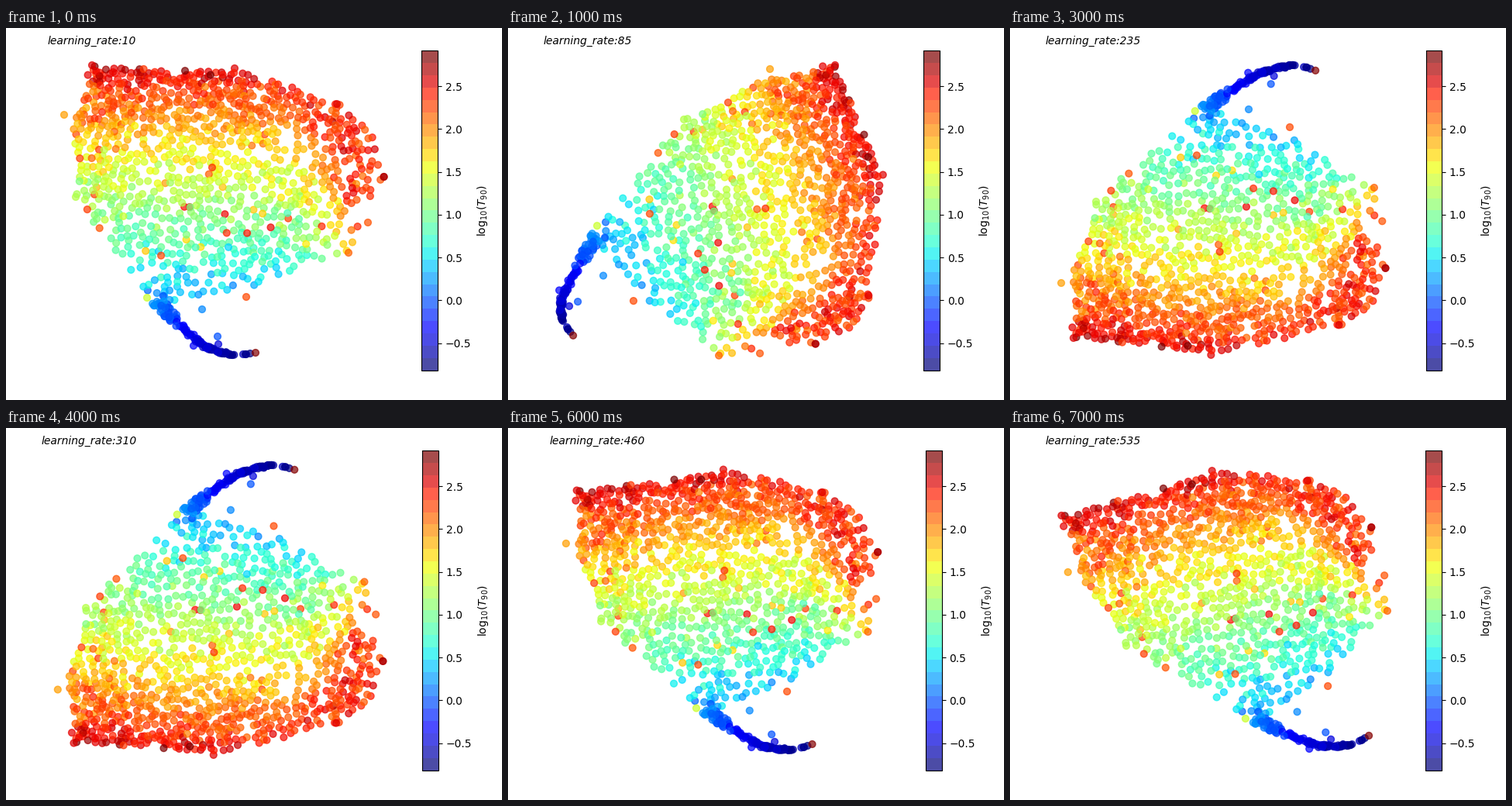
These frames come from a looping animation (640x480 px, 8 s). A matplotlib script:

```python
import numpy as np
import matplotlib.pyplot as plt
from matplotlib.animation import FuncAnimation
from matplotlib.colors import Normalize
from matplotlib.path import Path

W, H, DPI = 640, 480, 100
TOP, BOTTOM = 29.2, 441.6
RATES = [10, 85, 160, 235, 310, 385, 460, 535]
LEFT = [53.3, 45.3, 53.3, 45.3, 46.0, 45.6, 53.3, 45.3]
BAR = [536.4, 536.4, 539.3, 536.5, 537.3, 538.2, 539.2, 536.4]

# Twelve anchors of the embedding for each learning rate, in pixels:
# seven around the broad side, two at the neck, three along the tail.
POSES = {
    10: [(75, 112), (111, 48), (295, 52), (427, 98), (488, 192), (442, 290),
         (310, 347), (90, 218), (182, 348), (257, 412), (292, 422), (322, 419)],
    85: [(338, 53), (422, 47), (484, 189), (465, 346), (397, 407), (272, 423),
         (162, 352), (227, 118), (115, 255), (68, 351), (70, 376), (84, 397)],
    160: [(490, 124), (463, 56), (283, 48), (127, 98), (75, 177), (107, 279),
          (229, 345), (461, 229), (355, 353), (272, 413), (238, 422), (210, 417)],
    235: [(66, 329), (82, 400), (259, 422), (425, 383), (484, 310), (470, 206),
          (361, 128), (111, 224), (239, 107), (322, 58), (366, 47), (394, 55)],
    385: [(66, 346), (93, 413), (276, 422), (428, 378), (488, 292), (455, 191),
          (330, 125), (95, 240), (203, 116), (277, 59), (321, 47), (350, 53)],
    535: [(75, 186), (66, 113), (261, 55), (384, 68), (466, 128), (487, 236),
          (410, 333), (150, 281), (304, 375), (400, 411), (440, 409), (463, 397)],
}
POSES = {rate: np.array(pts, float) for rate, pts in POSES.items()}
POSES[310] = (POSES[235] + POSES[385]) / 2
POSES[460] = (POSES[10] + POSES[535]) / 2
ANCHOR_VALUES = [1.95, 2.6, 2.6, 2.6, 2.75, 2.2, 2.3, 1.3, 1.4, -0.6, -0.75, 2.9]

OUTLINE = Path([(106, 49), (200, 54), (300, 57), (345, 68), (430, 98),
                (470, 130), (487, 165), (487, 195), (478, 225), (468, 253),
                (442, 291), (420, 292), (385, 308), (330, 330), (262, 342),
                (215, 352), (185, 345), (140, 290), (112, 250), (90, 218),
                (90, 165), (86, 125), (102, 85)])
EXTRAS = [(306, 421, -0.6), (310, 421, -0.75), (315, 420, -0.8),
          (273, 398, -0.05), (253, 363, 0.15), (242, 410, -0.4),
          (274, 408, -0.5), (237, 231, 2.55), (266, 180, 2.4),
          (488, 192, 2.75), (309, 421, -0.8)]

rng = np.random.default_rng(12)


def weight(x, y):
    """Relative density: crowded along the top and the left corner."""
    w = 0.42 + 0.55 * np.exp(-(y - 50) / 50)
    if y < 210:
        w += 0.45 * np.exp(-((x - 120) / 35) ** 2)
    return w * (0.55 if x > 400 and y > 200 else 1)


def body_points(count):
    pts = np.empty((count, 2))
    n = 0
    while n < count:
        x, y = rng.uniform((80, 46), (490, 355))
        if rng.random() > weight(x, y) or not OUTLINE.contains_point((x, y)):
            continue
        gap = 3 + 2.5 * np.clip((y - 60) / 100, 0, 1)
        if n and np.hypot(*(pts[:n] - (x, y)).T).min() < gap:
            continue
        pts[n] = x, y
        n += 1
    return pts


def body_values(pts):
    x, y = pts.T
    lift = 45 * (np.maximum(x - 270, 0) / 130) ** 4
    depth = np.maximum(y - lift, np.minimum(y, 75))
    v = np.interp(depth,
                  [48, 62, 80, 110, 140, 170, 210, 250, 290, 325, 350],
                  [2.75, 2.58, 2.35, 2.1, 1.8, 1.55, 1.28, 1.0, 0.75, 0.45, 0.2])
    v = v + rng.normal(0, 0.13, len(v))
    odd = rng.random(len(v)) < np.where((x < 150) & (y < 240), 0.16, 0.06)
    stray = rng.uniform(1.6, 2.6, len(v))
    return np.where(odd & (y < 300), np.maximum(v, stray), v)


def tail_points(count):
    t = rng.random(count) ** 0.8
    k = [0, 0.25, 0.5, 0.75, 1]
    x = np.interp(t, k, [226, 240, 257, 275, 293]) + rng.normal(0, 1.6, count)
    y = np.interp(t, k, [385, 397, 411, 418, 422]) + rng.normal(0, 1.6, count) * (1 - 0.8 * t)
    return np.column_stack([x, y]), -0.35 - 0.42 * t + rng.normal(0, 0.05, count)


def neck_points(count):
    t = rng.random(count)
    side = rng.uniform(-8, 12, count) * (1 - 0.5 * t)
    x = 193 + 29 * t + 0.75 * side
    y = 352 + 31 * t - 0.65 * side
    return np.column_stack([x, y]), 0.15 - 0.3 * t + rng.normal(0, 0.08, count)


def kernel(a, b):
    r2 = ((a[:, None] - b[None]) ** 2).sum(-1)
    return 0.5 * r2 * np.log(r2 + 1e-9)


def affine(p):
    return np.column_stack([np.ones(len(p)), p])


def warp(pts, src, dst, smooth=500):
    """Thin-plate spline that carries the src anchors to dst."""
    n = len(src)
    m = np.zeros((n + 3, n + 3))
    m[:n, :n] = kernel(src, src) + smooth * np.eye(n)
    m[:n, n:] = affine(src)
    m[n:, :n] = affine(src).T
    coef = np.linalg.solve(m, np.vstack([dst, np.zeros((3, 2))]))
    return kernel(pts, src) @ coef[:n] + affine(pts) @ coef[n:]


body = body_points(1060)
tail, tail_v = tail_points(78)
neck, neck_v = neck_points(40)
extras = np.array(EXTRAS)
base = np.vstack([body, tail, neck, extras[:, :2], POSES[10]])
values = np.concatenate([body_values(body), tail_v, neck_v, extras[:, 2], ANCHOR_VALUES])
order = rng.permutation(len(base))
base, values = base[order], values[order]


def place(i):
    pts = base if i == 0 else warp(base, POSES[10], POSES[RATES[i]])
    low = LEFT[i] + 20.8, 47.9
    high = BAR[i] - 48.8, 422.6
    return np.clip(pts, low, high)


layouts = [place(i) for i in range(len(RATES))]

fig = plt.figure(figsize=(W / DPI, H / DPI), dpi=DPI, facecolor="white")
ax = fig.add_axes([0, 0, 1, 1])
ax.set(xlim=(0, W), ylim=(H, 0))
ax.axis("off")

norm = Normalize(-0.817, 2.916)
dots = ax.scatter(*layouts[0].T, c=values, s=40, cmap="jet", norm=norm, alpha=0.7)
title = ax.text(LEFT[0], 20.8, "", fontsize=10, style="italic", va="baseline")

cax = fig.add_axes([0.84, 0.08, 0.03, 0.86])
shades = plt.cm.ScalarMappable(norm, plt.get_cmap("jet", 26))
bar = fig.colorbar(shades, cax=cax, alpha=0.7, ticks=np.arange(-0.5, 2.6, 0.5))
bar.set_label(r"log$_{10}(T_{90})$", fontsize=10)


def update(i):
    dots.set_offsets(layouts[i])
    title.set_text(f"learning_rate:{RATES[i]}")
    title.set_x(LEFT[i])
    cax.set_position([BAR[i] / W, 1 - BOTTOM / H, 20.6 / W, (BOTTOM - TOP) / H])
    return dots, title


anim = FuncAnimation(fig, update, frames=len(RATES), interval=1000,
                     repeat=True, repeat_delay=0, blit=False)
plt.show()
```
